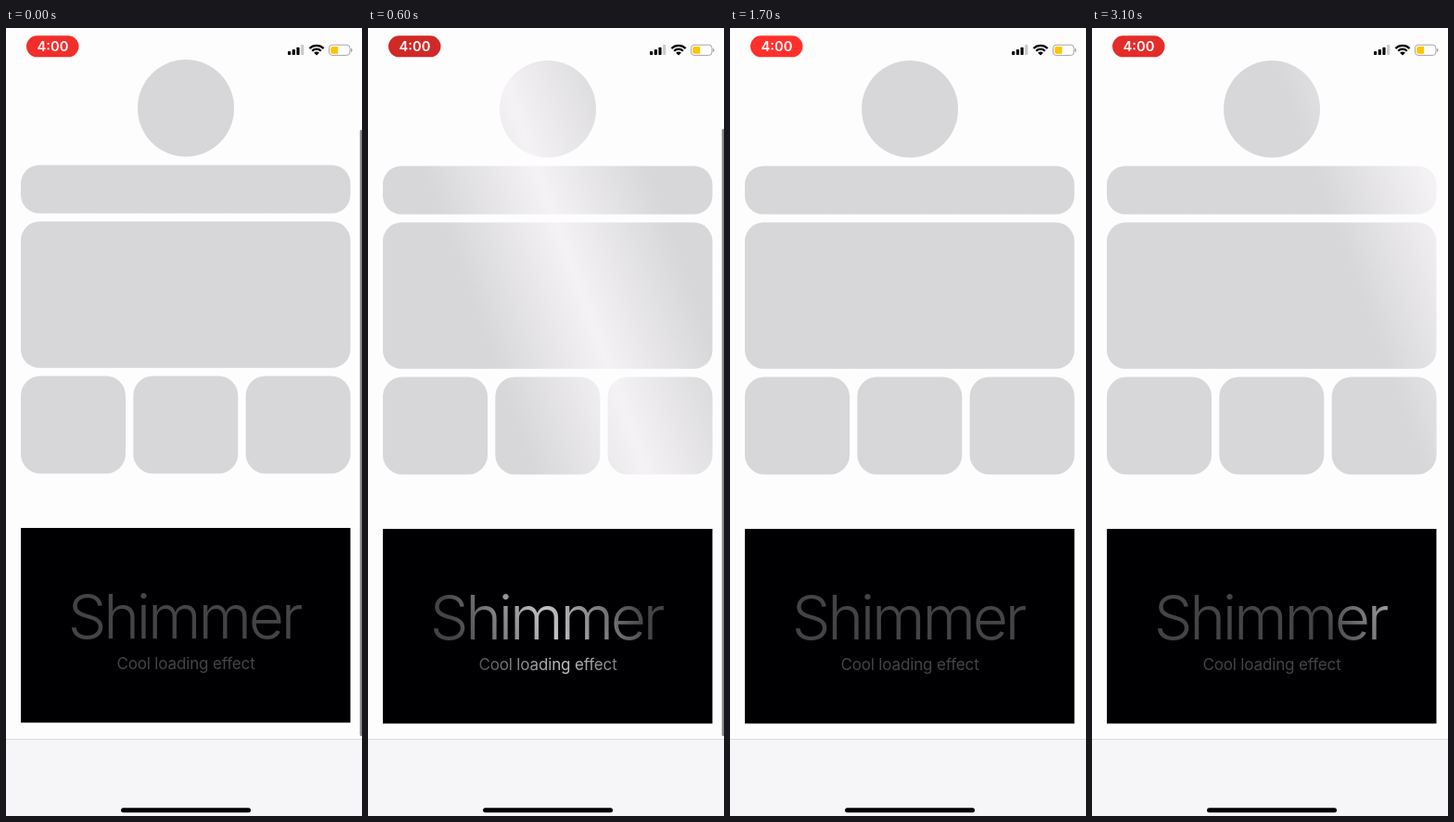
These frames come from a looping animation (384 by 848 pixels, 3200 ms). An HTML page with a canvas:

```html
<!DOCTYPE html>
<html lang="en">
<head>
<meta charset="utf-8">
<title>Shimmer</title>
<style>
  html, body { margin: 0; width: 100%; height: 100%; overflow: hidden; background: #fefdfe; }
  canvas { display: block; width: 100vw; height: 100vh; }
</style>
</head>
<body>
<canvas id="stage"></canvas>
<script>
const W = 384, H = 848;
const LOOP = 3200, STEP = 100, SWEEP = 2329;
const TILT = 20 * Math.PI / 180;
const FONT = 'Inter, "Open Sans", sans-serif';

const canvas = document.getElementById('stage');
const ctx = canvas.getContext('2d');
const dpr = window.devicePixelRatio || 1;
canvas.width = W * dpr;
canvas.height = H * dpr;

const clamp01 = v => Math.min(1, Math.max(0, v));
const mix = (a, b, k) => `rgb(${a.map((v, i) => Math.round(v + (b[i] - v) * k)).join(',')})`;

function box(x, y, w, h, r, fill) {
  ctx.beginPath();
  ctx.roundRect(x, y, w, h, r);
  ctx.fillStyle = fill;
  ctx.fill();
}

function label(str, x, y, size, weight, spacing, fill) {
  ctx.font = `${weight} ${size}px ${FONT}`;
  ctx.letterSpacing = spacing + 'px';
  ctx.textAlign = 'center';
  ctx.fillStyle = fill;
  ctx.fillText(str, x, y);
}

// Slanted light band centred on (cx, cy), fading out at `half` px to each side.
function band(cx, cy, half, base, peak) {
  const d = half * Math.cos(TILT);
  const dx = d * Math.cos(TILT), dy = -d * Math.sin(TILT);
  const g = ctx.createLinearGradient(cx - dx, cy - dy, cx + dx, cy + dy);
  g.addColorStop(0, base);
  g.addColorStop(0.5, peak);
  g.addColorStop(1, base);
  return g;
}

function statusBar(t) {
  const glow = 0.5 - 0.5 * Math.cos((t - 650) / 1000 * Math.PI);
  box(22, 8.3, 56.5, 23, 11.5, mix([208, 42, 39], [255, 48, 44], glow));
  label('4:00', 50.5, 25, 14.7, 600, 0, '#fff');

  [4, 6, 8.3, 11].forEach((h, i) =>
    box(304 + i * 4.7, 29 - h, 3.2, h, 0.8, i < 3 ? '#050507' : '#c9c8cb'));

  ctx.save();
  ctx.beginPath();
  ctx.moveTo(335, 29.6);
  ctx.arc(335, 29.6, 14, -Math.PI * 0.75, -Math.PI * 0.25);
  ctx.closePath();
  ctx.clip();
  ctx.strokeStyle = ctx.fillStyle = '#050507';
  ctx.lineWidth = 2.3;
  for (const r of [10.7, 6.9]) {
    ctx.beginPath();
    ctx.arc(335, 29.6, r, 0, Math.PI * 2);
    ctx.stroke();
  }
  ctx.beginPath();
  ctx.arc(335, 29.6, 4.2, 0, Math.PI * 2);
  ctx.fill();
  ctx.restore();

  ctx.beginPath();
  ctx.roundRect(348.5, 18.2, 22.5, 11.2, 3.4);
  ctx.strokeStyle = '#a5a4a8';
  ctx.lineWidth = 1;
  ctx.stroke();
  box(350.2, 19.9, 8, 7.8, [2, 0.5, 0.5, 2], '#fdc506');
  box(372, 22, 1.4, 3.8, [0, 1.2, 1.2, 0], '#a5a4a8');
}

function cards(t) {
  const cx = 115 + 1.05 * (t % SWEEP - 500);
  const fill = band(cx, 257, 122, '#d7d6d9', '#f4f2f5');
  box(142, 35, 104, 104.5, 52, fill);
  box(16, 148.5, 355.5, 52, 20, fill);
  box(16, 209.3, 355.5, 157.5, 20, fill);
  for (let i = 0; i < 3; i++) box(16 + i * 121.3, 375.5, 113, 105, 21, fill);
}

function banner(t) {
  box(16, 539, 355.5, 209.5, 0, '#000002');
  const cx = 102 + 0.95 * (t % SWEEP - 500);
  const fill = band(cx, 644, 105, '#444346', '#c4c2c5');
  label('Shimmer', 192, 657.5, 66, 300, -3.2, fill);
  label('Cool loading effect', 194, 690.5, 17, 400, -0.15, fill);
}

function draw(now) {
  const t = Math.floor(now % LOOP / STEP) * STEP;
  const lift = t < STEP ? -1 : 0;

  ctx.setTransform(dpr, 0, 0, dpr, 0, 0);
  box(0, 0, W, H, 0, '#fefdfe');

  ctx.translate(0, lift);
  cards(t);
  banner(t);
  ctx.translate(0, -lift);

  ctx.globalAlpha = 1 - clamp01((t - 1100) / 350);
  box(381.7, 108.5 - lift, 3, 653.5 + lift, 1.5, '#868588');
  ctx.globalAlpha = 1;

  statusBar(t);

  box(0, 765, W, 83, 0, '#f6f5f8');
  box(0, 765, W, 1, 0, '#d9d8db');
  box(124, 839.3, 140, 5, 2.5, '#000');

  requestAnimationFrame(draw);
}

const start = performance.now();
requestAnimationFrame(function frame() {
  draw(performance.now() - start);
});
</script>
</body>
</html>
```
